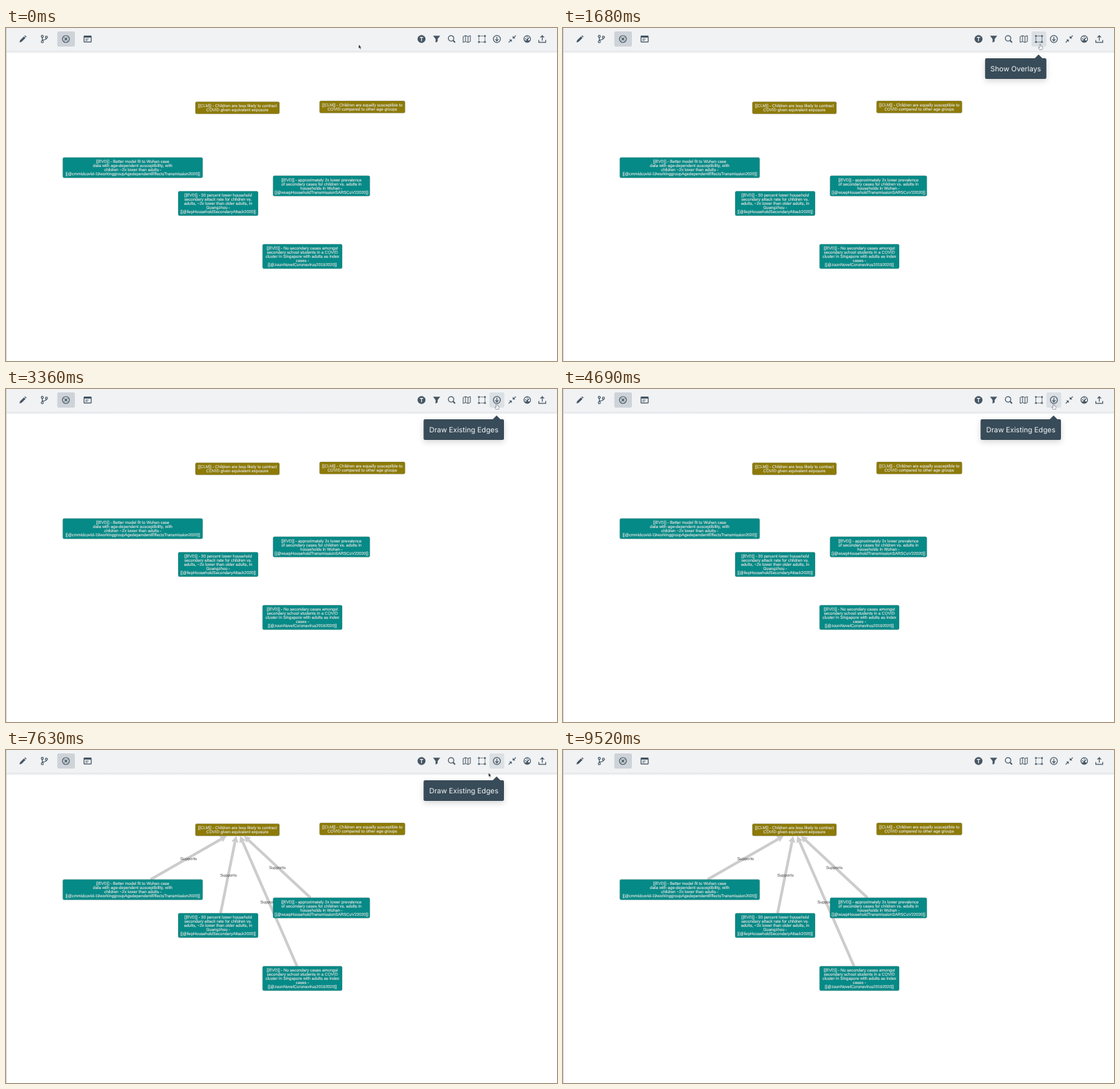
Recreate the animation shown at these times as an HTML page. Size 800 by 484 pixels, loop 9590 ms.

```html
<!DOCTYPE html>
<html lang="en">
<head>
<meta charset="utf-8">
<title>Discourse graph</title>
<style>
html, body { margin: 0; width: 100%; height: 100%; overflow: hidden; background: #fff; }
svg { display: block; width: 800px; height: 484px; text-rendering: geometricPrecision; }
text { text-anchor: middle; }
.node text { font: 6px "Liberation Sans", Arial, sans-serif; fill: #dcdfdc; stroke: #dcdfdc; stroke-width: .15; }
.edge text { font: 6px "Liberation Sans", Arial, sans-serif; fill: #444; }
#tip text { font: 10.4px Inter, sans-serif; fill: #f5f8fa; }
.icon { fill: none; stroke: #465663; stroke-width: 1.2; }
.icon .f { fill: #465663; stroke: none; }
</style>
</head>
<body>
<svg viewBox="0 0 800 484">
  <defs>
    <linearGradient id="fade" x2="0" y2="1">
      <stop stop-color="#d9dde0"/><stop offset="1" stop-color="#fff"/>
    </linearGradient>
    <filter id="shadow" x="-30%" y="-50%" width="160%" height="220%">
      <feDropShadow dx="0" dy="3" stdDeviation="4" flood-color="#10161a" flood-opacity=".16"/>
    </filter>
  </defs>
  <rect width="800" height="484" fill="#fff"/>
  <rect y="33" width="800" height="4" fill="url(#fade)"/>
  <rect width="800" height="33.5" fill="#f0f2f4"/>
  <rect width="1" height="484" fill="#cfd2d5"/>
  <rect x="74.5" y="5" width="25.5" height="22" rx="2" fill="#cdd3d8"/>
  <rect id="hover" y="5" width="21.5" height="22" rx="2" fill="#dbe0e4"/>
  <g id="icons"></g>
  <g id="edges"></g>
  <g id="nodes"></g>
  <g id="tip">
    <g fill="#394b59" filter="url(#shadow)">
      <rect y="44" height="30" rx="2"/>
      <path d="M-6.5 45L0 38.5L6.5 45Z"/>
    </g>
    <text y="63"/>
  </g>
  <path id="arrow" d="M0 0V6L1.4 4.8L2.4 7L3.5 6.5L2.5 4.4H4.3Z" fill="#222" stroke="#fff" stroke-width=".5"/>
  <path id="hand" d="M-1 3V-.5Q-.2-1.4.5-.5V2.2L3.3 3V5.6L2.6 7.5H-1.2L-3 4.6Q-2.6 3.6-1 5Z" fill="#fff" stroke="#667" stroke-width=".6"/>
</svg>
<script>
const LOOP = 9590;
const $ = id => document.getElementById(id);
const CLAIM = "#8e7a06", EVIDENCE = "#058a87";

// centre x, centre y, width, colour, lines
const nodes = [
  [336, 116, 122, CLAIM, ["[[CLM]] - Children are less likely to contract", "COVID given equivalent exposure"]],
  [517.3, 114.7, 124, CLAIM, ["[[CLM]] - Children are equally susceptible to", "COVID compared to other age groups"]],
  [184, 203, 203, EVIDENCE, ["[[EVD]] - Better model fit to Wuhan case", "data with age-dependent susceptibility, with",
    "children ~2x lower than adults -", "[[@cmmidcovid-19workinggroupAgedependentEffectsTransmission2020]]"]],
  [308, 255, 116, EVIDENCE, ["[[EVD]] - 30 percent lower household", "secondary attack rate for children vs.",
    "adults, ~2x lower than older adults, in", "Guangzhou -", "[[@liepHouseholdSecondaryAttack2020]]"]],
  [458, 229.5, 140.5, EVIDENCE, ["[[EVD]] - approximately 2x lower prevalence", "of secondary cases for children vs. adults in",
    "households in Wuhan -", "[[@wuepHouseholdTransmissionSARSCoV22020]]"]],
  [430.3, 332, 115.5, EVIDENCE, ["[[EVD]] - No secondary cases amongst", "secondary school students in a COVID",
    "cluster in Singapore with adults as index", "cases -", "[[@zounNovelCoronavirus20192020]]"]],
];

const height = n => 6 * n[4].length + 5.6;

$("nodes").innerHTML = nodes.map(n => {
  const [x, y, w, fill, lines] = n, h = height(n);
  const text = lines.map((s, i) => `<text x="${x}" y="${y + 2.1 + 6 * (i - (lines.length - 1) / 2)}">${s}</text>`);
  return `<g class="node"><rect x="${x - w / 2}" y="${y - h / 2}" width="${w}" height="${h}" rx="2"
    fill="${fill}" stroke="#354" stroke-opacity=".4" stroke-width=".6"/>${text.join("")}</g>`;
}).join("");

const [goalX, goalY] = nodes[0];
$("edges").innerHTML = nodes.slice(2).map(n => {
  const [x, y] = n, dx = goalX - x, dy = goalY - y, len = Math.hypot(dx, dy);
  const ux = dx / len, uy = dy / len;
  const at = v => x + (v - y) * dx / dy;
  const top = y - height(n) / 2, end = goalY + 9, tip = at(end);
  const bx = tip - ux * 9, by = end - uy * 9;
  return `<g class="edge"><path d="M${at(top)} ${top}L${bx} ${by}" stroke="#ccc" stroke-width="4"/>
    <path d="M${tip} ${end}L${bx - uy * 5} ${by + ux * 5}L${bx + uy * 5} ${by - ux * 5}Z" fill="#ccc"/>
    <text x="${(at(top) + tip) / 2}" y="${(top + end) / 2 + 3.2}">Supports</text></g>`;
}).join("");

// each icon is drawn around its own centre
const icons = [
  [24.5, '<path class="f" d="M-5 5L-4 1.8L1.6-3.8L3.8-1.6L-1.8 4ZM2.3-4.5L3.4-5.3L5.3-3.4L4.5-2.3Z"/>'],
  [55.5, '<circle cx="-2.8" cy="-3.8" r="1.5"/><circle cx="-2.8" cy="4" r="1.5"/><circle cx="3.2" cy="-2.6" r="1.5"/><path d="M-2.8-2.3V2.5M3.2-1Q3.2 1-2.8 1.6"/>'],
  [87, '<circle r="5"/><path d="M-2-2L2 2M2-2L-2 2"/>'],
  [118.5, '<rect x="-5.2" y="-4.4" width="10.4" height="8.8" rx=".6"/><path class="f" d="M-5-4.4H5V-2H-5Z"/><path d="M-3.3 0H1.5M-3.3 2H0" stroke-width=".9"/>'],
  [603.3, '<circle class="f" r="5.8"/><path d="M-2.4-2.4H2.4M0-2.4V3.2" stroke="#f0f2f4"/>'],
  [625.2, '<path class="f" d="M-5.2-4.8H5.2L1.5 0V3.4L-1.5 5.2V0Z"/>'],
  [647, '<circle cx="-.8" cy="-.9" r="4"/><path d="M2 2L5 5" stroke-width="1.8"/>'],
  [669, '<path d="M-5.2-3.6L-1.8-5L1.8-3.6L5.2-5V3.6L1.8 5L-1.8 3.6L-5.2 5ZM-1.8-5V3.6M1.8-3.6V5" stroke-width="1"/>'],
  [691, '<path d="M-4.4-4.4H4.4V4.4H-4.4Z" stroke-dasharray="1.6 .8" stroke-width="1"/><path class="f" d="M-5.6-5.6h2.4v2.4h-2.4zM3.2-5.6h2.4v2.4h-2.4zM-5.6 3.2h2.4v2.4h-2.4zM3.2 3.2h2.4v2.4h-2.4z"/>'],
  [712.7, '<circle r="5.1"/><path d="M0-3V2.6M-2.4.4L0 2.8L2.4.4"/>'],
  [735, '<path d="M5.2-5.2L1.4-1.4M-5.2 5.2L-1.4 1.4"/><path class="f" d="M.7-4.4V-.7H4.4ZM-.7 4.4V.7H-4.4Z"/>'],
  [756.8, '<circle r="4.8"/><path d="M0 1L2.6-2" /><path class="f" d="M-3.6 2H3.6L2 4.4H-2ZM-3.2-1h1.4v1.4h-1.4zM-1-3.6h1.6v1.4H-1z"/><circle class="f" cy=".8" r="1.4"/>'],
  [778.6, '<path d="M-5 1.6V4.8H5V1.6M0 2.4V-4.6M-2.7-2.2L0-4.9L2.7-2.2"/>'],
];
$("icons").innerHTML = icons.map(([x, d]) => `<g class="icon" transform="translate(${x} 16)">${d}</g>`).join("");

// from, to, button centre
const hovers = [[900, 1080, 669], [1080, 2950, 691], [2950, 7720, 712.7]];
// from, to, label, pointer x, left, width
const tips = [
  [960, 1200, "Open Map", 669, 611.8, 67.4],
  [1300, 2960, "Show Overlays", 690.5, 612.8, 89],
  [3080, 7730, "Draw Existing Edges", 712.3, 606.3, 116.7],
];
// time, x, y
const path = [[0, 512, 24], [280, 512, 24], [900, 663, 27], [1120, 681.5, 25], [1400, 693, 24], [2750, 693, 24],
  [3080, 712.5, 22], [7400, 712.5, 22], [7630, 700.5, 33], [8200, 655, 62], [8800, 655, 62], [9260, 640, -9], [LOOP, 640, -9]];
const EDGES_AT = 6800;

const active = (list, t) => list.find(([a, b]) => t >= a && t < b);
const show = (el, on) => el.style.display = on ? "" : "none";

function pointer(t) {
  const i = path.findIndex(p => p[0] > t);
  const [a, x0, y0] = path[i - 1], [b, x1, y1] = path[i];
  const k = (t - a) / (b - a), e = k * k * (3 - 2 * k);
  return `translate(${x0 + (x1 - x0) * e} ${y0 + (y1 - y0) * e})`;
}

function draw(now) {
  const t = now % LOOP;
  const hover = active(hovers, t), tip = active(tips, t);
  const hand = hover && t < 7500;

  show($("hover"), hover);
  if (hover) $("hover").setAttribute("x", hover[2] - 10.75);

  show($("tip"), tip);
  if (tip) {
    const [from, to, label, x, left, width] = tip;
    const box = $("tip").querySelector("rect"), text = $("tip").querySelector("text");
    box.setAttribute("x", left);
    box.setAttribute("width", width);
    $("tip").querySelector("path").setAttribute("transform", `translate(${x} 0)`);
    text.setAttribute("x", left + width / 2);
    text.textContent = label;
    $("tip").style.opacity = Math.min(1, (t - from) / 100, (to - t) / 70);
  }

  show($("edges"), t >= EDGES_AT);
  show($("arrow"), !hand);
  show($("hand"), hand);
  $(hand ? "hand" : "arrow").setAttribute("transform", pointer(t));
  requestAnimationFrame(draw);
}
draw(performance.now());
</script>
</body>
</html>
```
